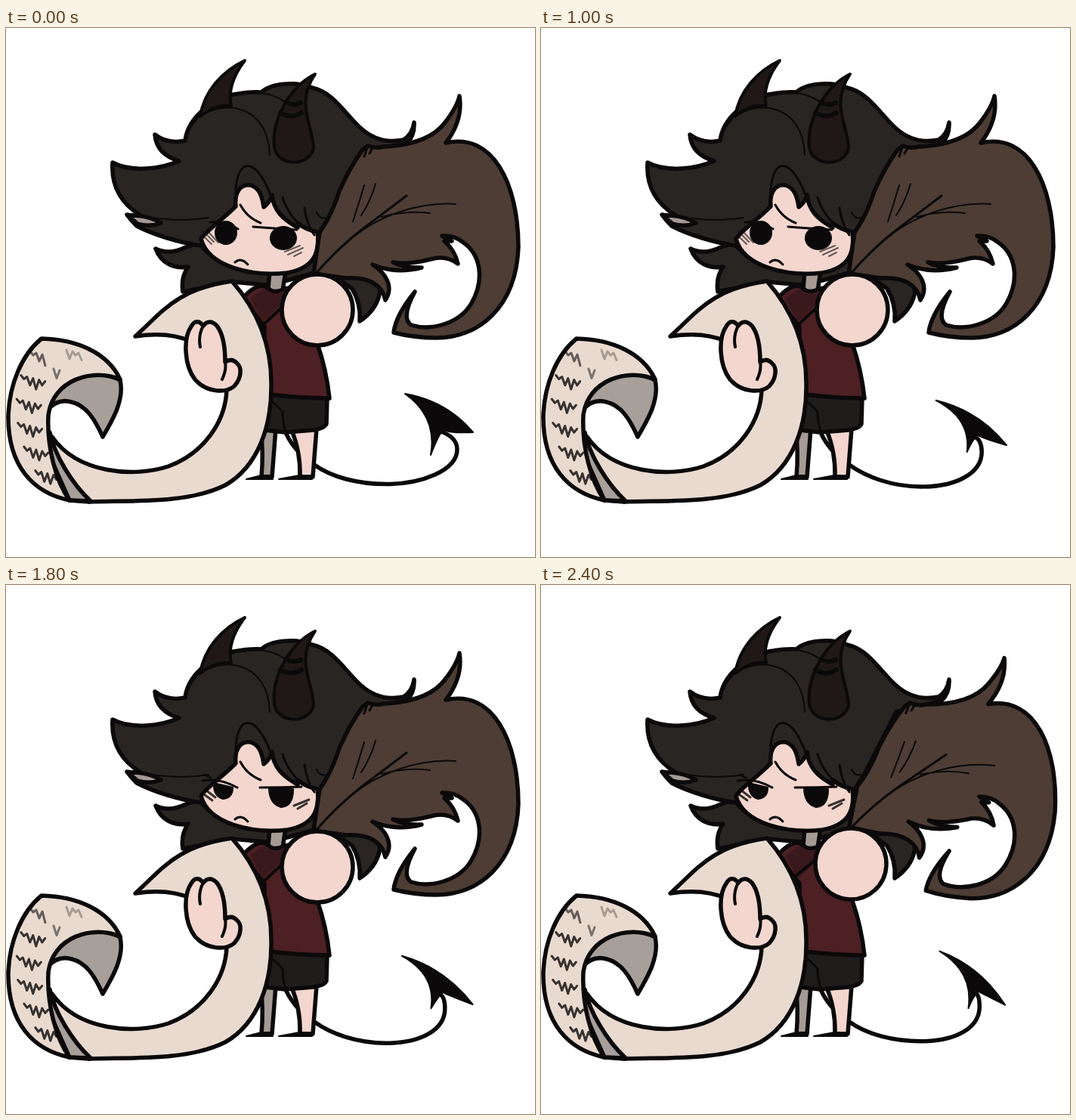
Write an HTML page that moves like this. It is 700 px wide and 700 px high and loops after 2600 ms.

```html
<!DOCTYPE html>
<html lang="en">
<head>
<meta charset="utf-8">
<title>Imp with quill and scroll</title>
<style>
html, body { margin: 0; width: 100%; height: 100%; overflow: hidden; background: #fff; }
svg { display: block; width: 100%; height: 100%; }
path, circle, ellipse { stroke: #0b0909; stroke-width: 5.5; stroke-linejoin: round; stroke-linecap: round; }
.hair { fill: #292523; }
.horn { fill: #1f1816; stroke-width: 4; }
.skin { fill: #f3d6ce; }
.shade { fill: #a59a94; }
.paper { fill: #e9dacf; }
.fold { fill: #a79f9a; }
.shirt { fill: #4d2023; }
.quill { fill: #4d3d34; }
.ink { fill: #0b0909; stroke-width: 2; }
.line { fill: none; stroke-width: 3; }
.thin { fill: none; stroke-width: 2; }
.flat { stroke: none; }
</style>
</head>
<body>
<svg viewBox="0 0 700 700">
  <path id="tail" fill="none"/>
  <path id="head" class="ink"/>

  <!-- legs and clothes -->
  <path class="shade" d="M337 530L357 530L352 594L338 594Q341 562 337 530Z"/>
  <path class="skin" d="M377 530L411 530L406 594L389 594Q390 560 377 530Z"/>
  <path class="ink" d="M318 597L353 597L352 592L338 592ZM361 597L405 597L405 593L388 592Z"/>
  <path fill="#1f1c1c" d="M342 484L425 490L424 524Q420 532 395 533L369 535L342 532Z"/>
  <path class="line" d="M353 495Q362 503 366 508Q366 522 370 533"/>
  <path class="hair" d="M198 292Q216 301 238 290L300 270L412 290L408 324L372 334L344 340L300 336L234 349Q231 330 241 316C222 319 205 311 198 292Z"/>
  <path class="hair" d="M440 332C475 320 499 338 494 353C490 370 480 380 468 388Q470 365 458 345Z"/>
  <path class="shade" stroke-width="3" d="M349 322L370 322L366 348Q356 355 347 344Z"/>
  <path class="shirt" d="M313 358Q328 340 342 341Q354 354 368 345L405 340L412 418Q424 452 428 490Q388 490 342 484L342 395Z"/>
  <path class="flat" fill="#3a191c" d="M323 358L342 344Q354 356 367 348L366 364L340 389Z"/>
  <path class="line" d="M342 341Q354 355 368 345"/>

  <!-- head -->
  <path class="hair" d="M258 288C230 284 196 274 173 262Q165 254 160 247Q168 249 178 248C152 232 139 208 141 178C165 191 204 187 229 176Q199 167 197 141Q214 154 237 149C241 118 275 91 307 87Q326 84 338 85C350 73 384 70 405 79C434 85 450 116 470 133C488 149 507 152 526 148Q538 140 540 125Q541 143 530 153L470 168L428 250L412 275L390 300L270 300Z"/>
  <path class="shade" stroke-width="3" d="M161 248Q188 247 205 258Q190 264 174 259Z"/>
  <path class="thin" d="M178 248Q225 258 268 251M237 149Q241 132 252 122"/>
  <path class="skin" stroke-width="4" d="M258 279C265 268 285 255 304 236C302 216 311 206 324 208C335 212 339 222 341 237Q349 231 352 221C354 241 366 253 386 264L386 258Q397 267 412 270C416 300 405 318 372 324C327 329 268 317 258 279Z"/>
  <path class="line" d="M310 234Q319 251 337 258M304 236C300 170 329 165 350 221M386 258Q370 240 366 224M408 274Q398 260 395 238"/>
  <path class="thin" d="M250 122C284 92 347 100 349 168M338 86Q354 88 368 97M428 250Q416 255 411 244"/>
  <path class="line" d="M303 310Q311 303 320 313"/>

  <g id="open">
    <ellipse class="ink" cx="291" cy="271" rx="14" ry="15"/>
    <ellipse class="ink" cx="367" cy="278" rx="17" ry="15"/>
    <path class="line" d="M270 257Q287 254 307 266M327 263Q352 265 385 267"/>
    <path class="thin" stroke-opacity=".6" d="M261 269L275 283M265 267L281 284M262 276L272 286M369 296L389 288M373 300L393 291M381 302L391 297"/>
  </g>
  <g id="squint">
    <path class="ink" d="M275 262L300 268Q300 282 287 283Q274 279 275 262Z"/>
    <path class="ink" d="M348 270L380 270Q380 293 364 294Q349 290 348 270Z"/>
    <path class="line" d="M260 259Q282 255 306 268M271 255L263 251M336 268Q365 268 391 267"/>
    <path class="line" stroke-opacity=".8" d="M259 275L273 285M264 271L277 281M381 292L401 284M386 296L398 289"/>
  </g>

  <path class="horn" d="M257 117C262 84 286 57 316 43C300 64 294 85 298 103Q276 101 257 117Z"/>
  <path class="horn" d="M409 61C378 76 351 119 355 158C360 184 400 184 407 160C407 130 382 101 409 61Z"/>
  <path class="line" d="M370 98Q380 104 390 99M363 112Q377 121 391 112" style="stroke-width:6"/>

  <!-- quill and the hand that holds it -->
  <g id="arm">
    <path class="quill" d="M407 325L415 270Q430 250 441 216Q455 184 472 161L479 156Q489 160 500 157C540 155 567 144 581 125Q597 104 600 90C604 115 595 135 582 152C644 138 678 206 678 290C675 370 625 410 570 410Q540 410 513 403C515 385 528 365 541 349C529 371 526 386 536 393C561 401 600 392 616 364C634 332 628 299 604 283Q593 274 577 275L590 282L580 282Q594 294 598 312Q582 300 562 306Q530 314 512 310Q528 318 550 317Q515 326 485 313C502 324 514 342 502 360C498 340 480 329 450 331Z"/>
    <path class="line" d="M409 326Q438 292 473 265L530 222M474 170L479 155M481 166L486 157"/>
    <path class="thin" d="M446 288C490 246 550 230 595 233M459 256Q467 232 474 208M470 248Q482 230 489 206M497 250Q530 241 561 245"/>
    <path class="line" d="M340 393L366 369" style="stroke-width:4"/>
    <circle class="skin" cx="412" cy="373" r="47"/>
  </g>

  <!-- scroll -->
  <path class="paper" d="M171 408C205 378 225 345 299 335C334 375 351 420 351 470C352 526 334 580 290 605C240 630 165 625 110 627L66 575L61 541C95 590 170 595 215 580C262 563 291 520 292 478L246 415Q215 401 171 408Z"/>
  <path class="fold" stroke-width="3" d="M58 535C64 565 88 604 112 626L84 625L55 560Z"/>
  <path class="fold" d="M57 503C70 462 118 449 151 466C157 492 141 519 128 541C118 519 107 500 87 495Q70 490 57 503Z"/>
  <path class="paper" d="M47 411C94 412 135 430 151 465C115 449 61 466 56 513C54 555 66 600 84 625C36 615 3 580 3 515C4 472 21 432 47 411Z"/>
  <path class="line" style="stroke-width:5.5" d="M84 625L110 627"/>
  <g id="script"></g>
  <path class="skin" stroke-width="5" d="M245 395C234 411 236 447 250 465C265 482 290 484 302 474C312 463 312 449 306 444Q299 436 290 442Q290 408 279 394Q269 384 261 394Q252 383 245 395Z"/>
  <path class="line" d="M261 394Q254 407 257 422M290 442Q292 452 286 465" style="stroke-width:4"/>
</svg>
<script>
const el = id => document.getElementById(id);

// One line of scrawl: a sloping zigzag of uneven height
function scrawl(x, y, width, alpha) {
  let d = `M${x} ${y}`;
  for (let dx = 4; dx <= width; dx += 4) {
    const up = dx % 8 ? 9 + 5 * Math.sin(dx + y) : 0;
    d += `L${x + dx} ${y + dx * .25 + up}`;
  }
  return `<path class="line" opacity="${alpha}" d="${d}"/>`;
}

let lines = scrawl(80, 426, 20, .3) + scrawl(63, 451, 8, .5);
for (let i = 0; i < 6; i++) {
  lines += scrawl(14 + 3.4 * (i - 2.3) ** 2, 428 + 31.5 * i, i ? 32 : 20, i ? .8 : .6);
}
el('script').innerHTML = lines;

// The tail swings once per loop, its barbs flutter three times, and it settles from its first pose
function drawTail(step) {
  const phase = 2 * Math.PI * step / 13;
  const swing = Math.cos(phase), flutter = Math.cos(3 * phase), settle = Math.exp(-step / 3);
  const px = 525 + 3 * swing, py = 489 - 5 * swing;
  const ax = 613.5 + 4.5 * flutter, ay = 556 - 21 * settle;
  const bx = 566 - 4 * flutter, by = 560 + 5 * settle;
  const low = 605.5 - 2 * swing, right = 580 + 17 * settle;
  const nx = (ax + bx) * .375 + px * .25, ny = (ay + by) * .375 + py * .25;
  el('tail').setAttribute('d',
    `M368 530Q378 558 408 578C430 594 465 ${low} 503 ${low}` +
    `C550 ${low} ${right} ${low - 18} ${right} ${low - 46}Q${right} ${low - 62} ${nx} ${ny}`);
  el('head').setAttribute('d',
    `M${px} ${py}Q${(px + ax) / 2 + 10} ${(py + ay) / 2 - 16} ${ax} ${ay}` +
    `Q${nx + 14} ${ny + 3} ${nx + 4} ${ny - 2}Q${nx - 3} ${ny + 6} ${bx} ${by}` +
    `Q${(px + bx) / 2 + 26} ${(py + by) / 2 - 10} ${px} ${py}Z`);
}

let last = -1;
function frame(now) {
  const step = Math.floor(now % 2600 / 200);
  if (step !== last) {
    last = step;
    drawTail(step);
    const squint = step >= 7, lowered = step === 10 || step === 12;
    el('open').style.display = squint ? 'none' : '';
    el('squint').style.display = squint ? '' : 'none';
    el('arm').setAttribute('transform', lowered ? 'translate(-2 -4) rotate(3.1 412 373)' : '');
  }
  requestAnimationFrame(frame);
}
frame(performance.now());
</script>
</body>
</html>
```
